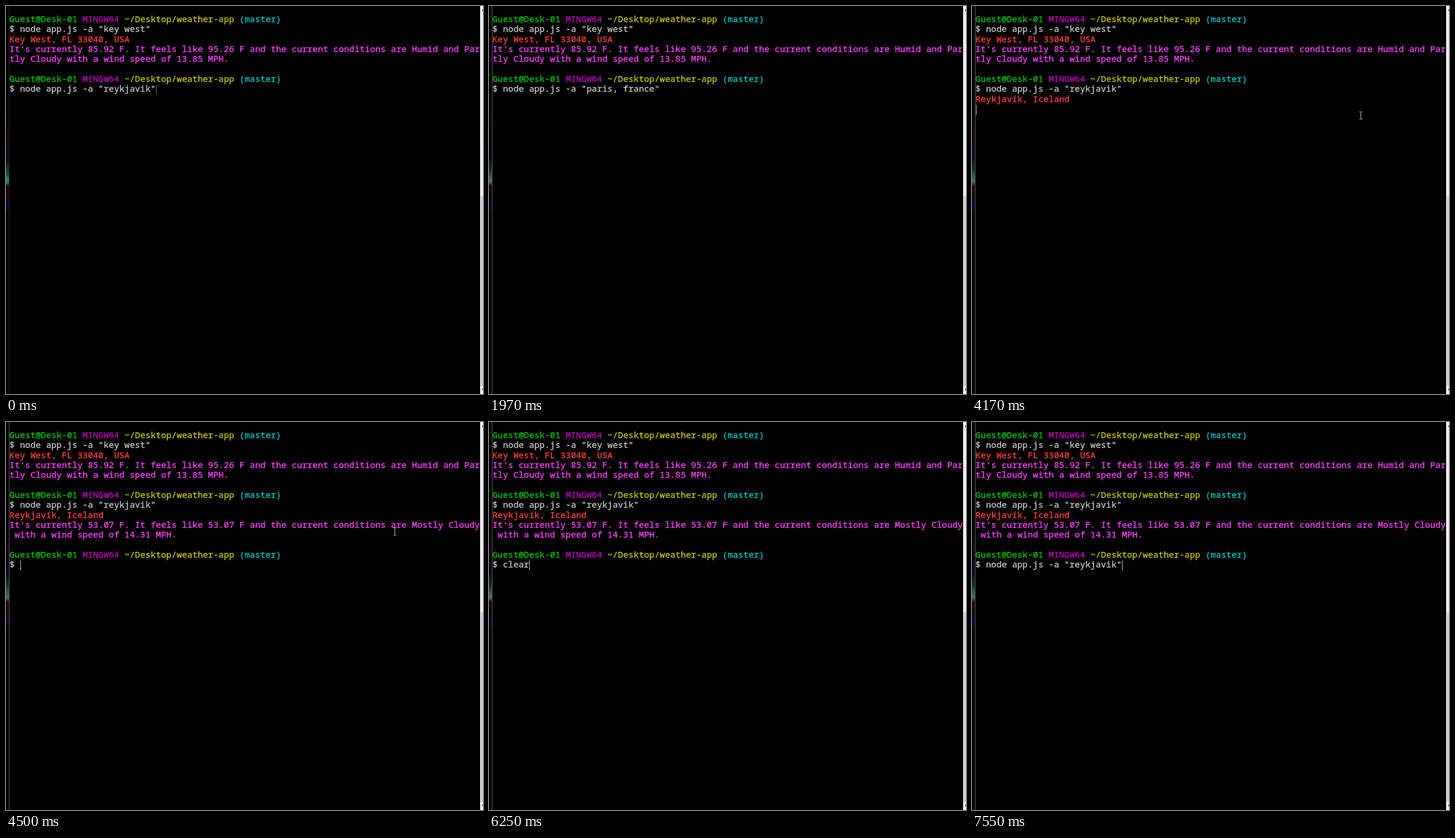
Recreate the animation shown at these times as an HTML page. Size 830 px wide and 675 px high, loop 8 s.

```html
<!DOCTYPE html>
<html lang="en">
<head>
<meta charset="utf-8">
<title>Weather app in a terminal</title>
<style>
  html, body { margin: 0; width: 100%; height: 100%; overflow: hidden; background: #000; }
  svg { display: block; width: 830px; height: 675px; }
  text { font: 15.167px "Noto Sans Mono", "DejaVu Sans Mono", monospace; white-space: pre; color: #c8c8c8; }
  tspan { fill: currentColor; stroke: currentColor; stroke-width: .3px; }
  .user { color: #00c800; }
  .sys { color: #c000c0; }
  .path { color: #c8c800; }
  .branch { color: #00c8c8; }
  .place { color: #ff4040; }
  .report { color: #ff40ff; }
</style>
</head>
<body>
<svg id="stage" viewBox="0 0 830 675">
  <defs>
    <linearGradient id="idle" gradientUnits="userSpaceOnUse" x1="0" y1="180" x2="0" y2="360">
      <stop offset="0" stop-color="#000"/>
      <stop offset=".2" stop-color="#10000f"/>
      <stop offset=".5" stop-color="#0c0418"/>
      <stop offset=".54" stop-color="#14262c"/>
      <stop offset=".63" stop-color="#1c4a34"/>
      <stop offset=".67" stop-color="#129a58"/>
      <stop offset=".69" stop-color="#1c8a50"/>
      <stop offset=".71" stop-color="#5a5a56"/>
      <stop offset=".74" stop-color="#1c0408"/>
      <stop offset=".88" stop-color="#14000c"/>
      <stop offset=".93" stop-color="#04044c"/>
      <stop offset="1" stop-color="#000"/>
    </linearGradient>
    <linearGradient id="active" gradientUnits="userSpaceOnUse" x1="0" y1="180" x2="0" y2="360">
      <stop offset="0" stop-color="#000"/>
      <stop offset=".25" stop-color="#100014"/>
      <stop offset=".46" stop-color="#0a0416"/>
      <stop offset=".58" stop-color="#12302a"/>
      <stop offset=".66" stop-color="#2a7040"/>
      <stop offset=".7" stop-color="#56685a"/>
      <stop offset=".74" stop-color="#1c0408"/>
      <stop offset=".88" stop-color="#10000a"/>
      <stop offset=".94" stop-color="#040440"/>
      <stop offset="1" stop-color="#000"/>
    </linearGradient>
  </defs>
  <rect width="830" height="675"/>
  <g id="blurred">
    <rect y="180" width="5" height="180" fill="url(#idle)"/>
    <rect x="5" width="1" height="675" fill="#262626"/>
  </g>
  <g id="focused">
    <rect y="180" width="5" height="180" fill="url(#active)"/>
    <rect x="5" width="1" height="675" fill="#5c5c5c"/>
  </g>
  <rect x="825" width="5" height="675" fill="#f0f0f0"/>
  <rect x="826" y="331" width="4" height="330" fill="#cdcdcd"/>
  <path d="M828 8.5L830 5.5V8.5ZM828 666L830 669V666Z"/>
  <g id="screen"></g>
  <g id="mouse">
    <path d="M-2.5 -6.5H-.5M.5 -6.5H2.5M-2.5 6.5H-.5M.5 6.5H2.5M0 -6V6" fill="none" stroke="#e0e0e0"/>
  </g>
</svg>
<script>
const LOOP = 8000, LEFT = 6.7, CELL = 9.1, ROW = 52 / 3;
const $ = id => document.getElementById(id);

function make(tag, attrs, parent = $("screen")) {
  const el = document.createElementNS("http://www.w3.org/2000/svg", tag);
  for (const k in attrs) el.setAttribute(k, attrs[k]);
  return parent.appendChild(el);
}

// steps: [time, value] pairs, each value held until the next
function hold(el, prop, steps) {
  const frames = steps.map(([t, v]) => ({ offset: t / LOOP, [prop]: v, easing: "step-end" }));
  frames.push({ ...frames[frames.length - 1], offset: 1 });
  el.animate(frames, { duration: LOOP, iterations: Infinity });
}

// spans: [from, to] pairs during which the element is visible
function show(el, ...spans) {
  const steps = spans[0][0] > 0 ? [[0, 0]] : [];
  for (const [from, to] of spans) {
    steps.push([from, 1]);
    if (to < LOOP) steps.push([to, 0]);
  }
  hold(el, "opacity", steps);
}

function line(row, ...parts) {
  const el = make("text", { x: LEFT - .7, y: 28 + row * ROW });
  for (const [str, cls] of parts) make("tspan", { class: cls || "" }, el).textContent = str;
  return el;
}

const prompt = row => line(row, ["Guest@Desk-01", "user"], [" MINGW64", "sys"],
  [" ~/Desktop/weather-app", "path"], [" (master)", "branch"]);
const ask = city => `node app.js -a "${city}"`;
const command = (row, str) => line(row, ["$ " + str]);

function caret(row, col, color = "#c8c8c8") {
  return make("rect", { x: Math.floor(LEFT + col * CELL + .3), y: Math.round(15.2 + row * ROW + .3),
    width: 1, height: 17, fill: color });
}

prompt(0);
command(1, ask("key west"));
line(2, ["Key West, FL 33040, USA", "place"]);
line(3, ["It's currently 85.92 F. It feels like 95.26 F and the current conditions are Humid and Par", "report"]);
line(4, ["tly Cloudy with a wind speed of 13.85 MPH.", "report"]);
prompt(6);

show(command(7, ask("reykjavik")), [0, 1430], [2420, LOOP]);
show(command(7, ask("paris, france")), [1430, 2420]);
show(line(8, ["Reykjavík, Iceland", "place"]), [3850, LOOP]);
show(line(9, ["It's currently 53.07 F. It feels like 53.07 F and the current conditions are Mostly Cloudy", "report"]), [4400, LOOP]);
show(line(10, [" with a wind speed of 14.31 MPH.", "report"]), [4400, LOOP]);
show(prompt(12), [4500, LOOP]);
show(command(13, ""), [4500, LOOP]);

// walking through the shell history
const recall = [
  ["reykjavik", [5050, 5580], [7550, LOOP]],
  ["key west", [5580, 6130], [6800, 7550]]
];
for (const [city, ...spans] of recall) show(line(13, ["  " + ask(city)]), ...spans);
show(line(13, ["  clear"]), [6130, 6800]);

show(caret(7, 28, "#606060"), [0, 1100]);
show(caret(7, 28), [1100, 1430], [2420, 2960]);
show(caret(7, 32), [1530, 1970]);
show(caret(8, 0), [3180, 3850]);
show(caret(9, 0), [3850, 4400]);
show(caret(13, 2), [4500, 5050]);
show(caret(13, 28), [5160, 5580], [7550, LOOP]);
show(caret(13, 27), [5580, 6130], [6900, 7330]);
show(caret(13, 7), [6250, 6800]);

show($("blurred"), [0, 1100]);
show($("focused"), [1100, LOOP]);

const at = (x, y) => `translate(${x}px, ${y}px)`;
const moves = [[0, at(756.5, 663.5)]];
for (let i = 0; i < 8; i++) {
  const left = (1 - i / 7) ** 2;
  moves.push([200 + Math.round(i * 78 / 7) * 10,
    at(Math.round(682 + 75 * left) - .5, Math.round(185 + 478 * left) + .5)]);
}
moves.push([3960, at(677.5, 189.5)], [4060, at(676.5, 190.5)]);
hold($("mouse"), "transform", moves);
show($("mouse"), [200, 1430], [2750, 3180], [3960, 5050]);
</script>
</body>
</html>
```
